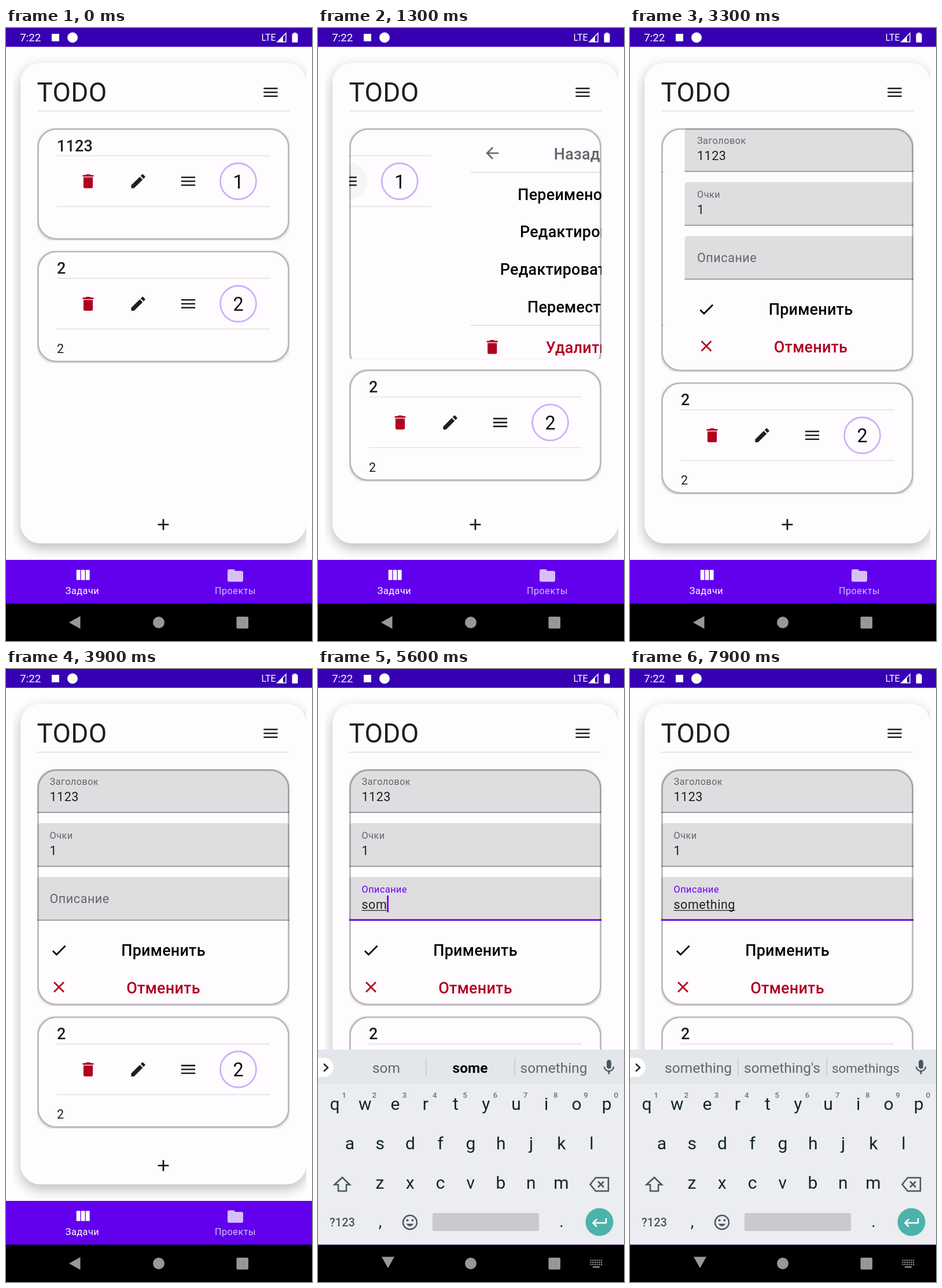
Recreate the animation shown at these times as an HTML page with a canvas. Size 529 px wide and 1058 px high, loop 8 s.

```html
<!DOCTYPE html>
<html lang="ru">
<head>
<meta charset="utf-8">
<title>TODO</title>
<style>
html, body { margin: 0; height: 100%; overflow: hidden; background: #fff; }
canvas { display: block; }
</style>
</head>
<body>
<canvas id="stage" width="529" height="1058"></canvas>
<script>
const c = document.getElementById('stage').getContext('2d');
const LOOP = 8000, DP = 1.347;
const PURPLE = '#6200ee', RED = '#b00020', INK = '#1f1f21', GRAY = '#656468';
const LEFT = 54, TOP = 173, WIDTH = 436;

const icons = {
  menu: 'M3 18h18v-2H3zM3 13h18v-2H3zM3 6v2h18V6z',
  trash: 'M6 19c0 1.1.9 2 2 2h8c1.1 0 2-.9 2-2V7H6zM19 4h-3.5l-1-1h-5l-1 1H5v2h14z',
  pencil: 'M3 17.25V21h3.75L17.81 9.94l-3.75-3.75zM20.71 7.04c.39-.39.39-1.02 0-1.41l-2.34-2.34c-.39-.39-1.02-.39-1.41 0l-1.83 1.83 3.75 3.75z',
  plus: 'M19 13h-6v6h-2v-6H5v-2h6V5h2v6h6z',
  back: 'M20 11H7.83l5.59-5.59L12 4l-8 8 8 8 1.41-1.41L7.83 13H20z',
  check: 'M9 16.17L4.83 12l-1.42 1.41L9 19 21 7l-1.41-1.41z',
  cross: 'M19 6.41L17.59 5 12 10.59 6.41 5 5 6.41 10.59 12 5 17.59 6.41 19 12 13.41 17.59 19 19 17.59 13.41 12z',
  folder: 'M10 4H4c-1.1 0-2 .9-2 2v12c0 1.1.9 2 2 2h16c1.1 0 2-.9 2-2V8c0-1.1-.9-2-2-2h-8z',
  columns: 'M10 18h5V5h-5zM4 18h5V5H4zM16 5v13h5V5z',
  mic: 'M12 14c1.66 0 3-1.34 3-3V5c0-1.66-1.34-3-3-3S9 3.34 9 5v6c0 1.66 1.34 3 3 3zm5.3-3c0 3-2.54 5.1-5.3 5.1S6.7 14 6.7 11H5c0 3.41 2.72 6.23 6 6.72V21h2v-3.28c3.28-.48 6-3.3 6-6.72z'
};
for (const name in icons) icons[name] = new Path2D(icons[name]);

// [time, suggestions] for each typed letter
const WORD = 'something';
const typing = [
  [4900, 's', 'so', 'she'],
  [5250, 'so', 'some', 'something'],
  [5540, 'som', 'some', 'something'],
  [6080, 'some', 'something', 'someone'],
  [6400, 'somet', 'something', 'sometimes'],
  [6650, 'someth', 'something', 'somethings'],
  [6850, 'somethi', 'something', 'somethings'],
  [7080, 'somethin', 'something', 'somethings'],
  [7360, 'something', "something's", 'somethings']
];
const FOCUS = 4020, SLIDE_1 = 1105, SLIDE_2 = 2979, SLIDE_TIME = 500;

const clamp = x => Math.max(0, Math.min(1, x));
const mix = (a, b, p) => a + (b - a) * p;

// cubic-bezier(.4, 0, .2, 1)
function ease(x) {
  x = clamp(x);
  let lo = 0, hi = 1;
  for (let i = 0; i < 20; i++) {
    const s = (lo + hi) / 2, r = 1 - s;
    if (1.2 * r * r * s + .6 * r * s * s + s ** 3 < x) lo = s; else hi = s;
  }
  return 3 * (1 - lo) * lo * lo + lo ** 3;
}

// Critically damped spring, stiffness 400
function spring(ms) {
  const wt = Math.max(0, ms) * .02;
  return 1 - (1 + wt) * Math.exp(-wt);
}

function rect(x, y, w, h, color, r = 0) {
  c.fillStyle = color;
  c.beginPath();
  c.roundRect(x, y, w, h, r);
  c.fill();
}

function disc(x, y, r, color) {
  c.fillStyle = color;
  c.beginPath();
  c.arc(x, y, r, 0, 7);
  c.fill();
}

function ring(x, y, r, width, color) {
  c.strokeStyle = color;
  c.lineWidth = width;
  c.beginPath();
  c.arc(x, y, r, 0, 7);
  c.stroke();
}

function shape(d, color, width) {
  const path = new Path2D(d);
  c.fillStyle = c.strokeStyle = color;
  c.lineWidth = width || 1;
  if (width) c.stroke(path); else c.fill(path);
}

function text(str, x, y, size, color, { align = 'left', weight = 400, gap = 0 } = {}) {
  c.font = `${weight} ${size}px Roboto, sans-serif`;
  c.letterSpacing = gap + 'px';
  c.textAlign = align;
  c.fillStyle = color;
  c.fillText(str, x, y);
  return c.measureText(str).width;
}
const heading = (str, x, y, color, align) =>
  text(str, x, y, 26.94, color, { weight: 500, gap: .2, align });
const body = (str, x, y, color = INK) => text(str, x, y, 21.55, color, { gap: .5 });

function icon(name, x, y, color, scale = DP) {
  c.save();
  c.translate(x, y);
  c.scale(scale, scale);
  c.translate(-12, -12);
  c.fillStyle = color;
  c.fill(icons[name]);
  c.restore();
}

const divider = (y, x = 88, w = 368) => rect(x, y - .7, w, 1.4, '#dfdee1');

function shifted(dx, draw) {
  if (Math.abs(dx) >= WIDTH) return;
  c.save();
  c.translate(dx, 0);
  draw();
  c.restore();
}

function statusBar() {
  rect(0, 0, 529, 32.5, '#3700b3');
  text('7:22', 24, 23, 18.9, '#fff');
  rect(79, 10, 13, 13, '#fff', 1);
  disc(115, 16.5, 9, '#fff');
  text('LTE', 441.5, 22, 16, '#fff');
  shape('M469 24L484 9V24Z', '#fff', 1.5);
  shape('M469 24L479 14V24Z', '#fff');
  rect(494.5, 9.5, 10, 15.5, '#fff', 1.5);
  rect(497, 8, 5, 3, '#fff');
}

function board() {
  c.save();
  c.beginPath();
  c.rect(12, 32.5, 507, 886);
  c.clip();
  c.shadowColor = 'rgba(0,0,0,.27)';
  c.shadowBlur = 22;
  c.shadowOffsetY = 8;
  rect(25, 60, 494, 829.5, '#fefcff', 34);
  c.restore();
  text('TODO', 53.5, 127, 45.8, INK, { gap: .33 });
  icon('menu', 457.5, 111, INK);
  divider(143.5, LEFT, WIDTH);
  icon('plus', 272, 857, '#111');
}

// Card whose visible part may be shorter than its outline
function card(y, outline, visible, content) {
  c.save();
  c.beginPath();
  c.rect(LEFT, y, WIDTH, visible + 1);
  c.clip();
  c.save();
  c.shadowColor = 'rgba(0,0,0,.25)';
  c.shadowBlur = 5;
  c.shadowOffsetY = 1;
  rect(LEFT, y, WIDTH, outline, '#fefcff', 33);
  c.restore();
  c.save();
  c.beginPath();
  c.roundRect(LEFT, y, WIDTH, outline, 33);
  c.clip();
  content();
  c.restore();
  c.strokeStyle = 'rgba(0,0,0,.27)';
  c.lineWidth = 2.8;
  c.beginPath();
  c.roundRect(LEFT + 1.4, y + 1.4, WIDTH - 2.8, outline - 2.8, 31.6);
  c.stroke();
  c.restore();
}

function task(y, title, points, note) {
  heading(title, 88, y + 39.5, INK);
  divider(y + 47.5);
  icon('trash', 142, y + 91.5, RED);
  icon('pencil', 228.5, y + 91.5, INK);
  icon('menu', 315, y + 91.5, INK);
  ring(401.5, y + 91.5, 31, 2.8, '#cdb2f6');
  text(points, 401.5, y + 103.5, 32.3, '#0c0c0d', { align: 'center' });
  divider(y + 135);
  body(note, 88, y + 176.5);
}

function menu() {
  icon('back', 125.5, 216, GRAY);
  heading('Назад', 272, 227, GRAY, 'center');
  divider(249);
  ['Переименовать', 'Редактировать', 'Редактировать очки', 'Переместить'].forEach((s, i) =>
    heading(s, 272, 296.5 + 64.7 * i, '#050505', 'center'));
  divider(513.3);
  icon('trash', 125.5, 550.5, RED);
  heading('Удалить', 272, 560.5, RED, 'center');
}

function field(y, label, value) {
  rect(LEFT, y, WIDTH, 75, '#dfdde0', [5, 5, 0, 0]);
  rect(LEFT, y + 73.8, WIDTH, 1.4, '#858387');
  if (value) {
    text(label, 75.5, y + 27, 16.16, GRAY, { gap: .54 });
    body(value, 75.5, y + 55);
  }
}

function form(t) {
  field(173, 'Заголовок', '1123');
  field(266, 'Очки', '1');
  field(359, 'Описание');
  const p = ease((t - FOCUS) / 150);
  text('Описание', 75.5, mix(404, 386, p), mix(21.55, 16.16, p), p > .5 ? PURPLE : GRAY, { gap: .54 });
  if (p > 0) rect(LEFT, 434.5 - 2.8 * p, WIDTH, 2.8 * p, PURPLE);

  const count = typing.filter(k => k[0] <= t).length;
  let end = 75.5;
  if (count) {
    const w = body(WORD.slice(0, count), 75.5, 414);
    rect(75.5, 416, w, 1.3, INK);
    end += w;
  }
  const last = count ? typing[count - 1][0] : FOCUS;
  if (t >= FOCUS && (t - last) % 1000 < 500) rect(end, 391, 2.7, 29, PURPLE);

  icon('check', 91.5, 485.5, '#050505');
  heading('Применить', 272, 495, '#050505', 'center');
  icon('cross', 91.5, 549, RED);
  heading('Отменить', 272, 559.5, RED, 'center');
}

function cards(t) {
  const a = ease((t - SLIDE_1) / SLIDE_TIME), b = ease((t - SLIDE_2) / SLIDE_TIME);
  const shrink = SLIDE_2 + SLIDE_TIME;
  const height = 192.5 + 227 * spring(t - SLIDE_1) - 12 * spring(t - shrink);
  const outline = t < SLIDE_1 ? 192.5 : t < shrink ? 419.5 : 407.5;
  card(TOP, outline, height, () => {
    shifted(-WIDTH * a, () => {
      if (t > 1020 && t < 1450) disc(315, 264.5, 31 * ease((t - 1000) / 200), 'rgba(0,0,0,.03)');
      task(TOP, '1123', '1', '');
    });
    shifted(WIDTH * (1 - a - b), menu);
    shifted(WIDTH * (1 - b), () => form(t));
  });
  const y = TOP + height + 19;
  card(y, 192.5, 192.5, () => task(y, '2', '2', '2'));
}

function tabs() {
  rect(0, 918, 529, 76, PURPLE);
  const dim = '#d8bffb', style = { align: 'center', gap: .54 };
  icon('columns', 132.5, 944.7, '#fff');
  text('Задачи', 132, 977, 16.16, '#fff', style);
  icon('folder', 396.5, 945, dim);
  text('Проекты', 396.5, 977, 16.16, dim, style);
}

function systemBar(typingOn) {
  const gray = '#98979b';
  rect(0, 993.5, 529, 65, '#000');
  disc(264, 1026, 10, gray);
  rect(398.5, 1016, 20.5, 20.5, gray, 2);
  if (!typingOn) return shape('M109 1026L128.5 1015V1037Z', gray);
  shape('M110 1014.5H132L121 1034Z', gray);
  for (let row = 0; row < 3; row++)
    for (let col = 0; col < 6; col++) rect(470.5 + col * 3.7, 1019.5 + row * 3.7, 2.2, 2.2, gray);
  rect(475, 1031, 12, 2.2, gray);
}

function suggestions(t) {
  const now = typing.filter(k => k[0] <= t).pop();
  const words = now ? now.slice(1) : ['thanks', 'I', 'we'];
  const strong = now && words[0] !== WORD;
  words.forEach((word, i) => {
    const bold = strong && i === 1;
    c.font = '400 24.5px Roboto, sans-serif';
    c.letterSpacing = '0px';
    const size = 24.5 * Math.min(1, 133 / c.measureText(word).width, i === 2 ? 117 / c.measureText(word).width : 1);
    text(word, [118, 263, 407.5][i], 697, size, bold ? '#050505' : '#61676c',
      { align: 'center', weight: bold ? 700 : 400 });
  });
}

function keyboard(t) {
  const alpha = 1 - (1 - clamp((t - 4100) / 280)) ** 2;
  if (!alpha) return;
  const ink = '#14242e', soft = '#485660', center = { align: 'center' };
  c.save();
  c.globalAlpha = alpha;
  c.translate(0, 43 * (1 - alpha));
  rect(0, 657, 529, 60, '#e3e6ea');
  rect(0, 717, 529, 276.5, '#ebedf1');
  rect(-20, 671, 47, 33, '#fff', 16.5);
  shape('M10 681.5L17 688L10 694.5', '#222', 2.4);
  rect(186, 671, 1.4, 32, '#c3c7cb');
  rect(339.5, 671, 1.4, 32, '#c3c7cb');
  suggestions(t);
  icon('mic', 503, 687.5, soft, 1.3);

  [['qwertyuiop', 29, 761], ['asdfghjkl', 55, 829], ['zxcvbnm', 107, 897]].forEach(([keys, x, y], row) =>
    [...keys].forEach((key, i) => {
      text(key, x + 52.25 * i, y, 30, ink, center);
      if (!row) text((i + 1) % 10, x + 16 + 52.25 * i, 740, 13.5, '#6a737a', { align: 'center', weight: 500 });
    }));

  shape('M42 877.5L55 890H49V901H35V890H28.5Z', soft, 2.5);
  shape('M470.5 889.5L480 878H502V901H480ZM484 884.5L494 894.5M494 884.5L484 894.5', soft, 2.5);
  text('?123', 42, 962, 20, soft, { align: 'center', weight: 500 });
  text(',', 107.5, 963, 28, ink, center);
  text('.', 421, 963, 28, ink, center);
  ring(159, 955, 12, 2.5, soft);
  disc(154.7, 951.5, 2, soft);
  disc(163.3, 951.5, 2, soft);
  shape('M152.5 957.5Q159 966 165.5 957.5Z', soft);
  rect(198, 939, 184, 31, '#c8cace', 3);
  disc(486.5, 954.5, 24, '#4bb3ab');
  shape('M498 948V956H476M482 949.5L475.5 956L482 962.5', '#fff', 2.6);
  c.restore();
}

function frame(now) {
  const t = now % LOOP;
  rect(0, 0, 529, 1058, '#fefeff');
  board();
  cards(t);
  statusBar();
  tabs();
  systemBar(t >= 4100);
  keyboard(t);
  requestAnimationFrame(frame);
}
requestAnimationFrame(frame);
</script>
</body>
</html>
```
